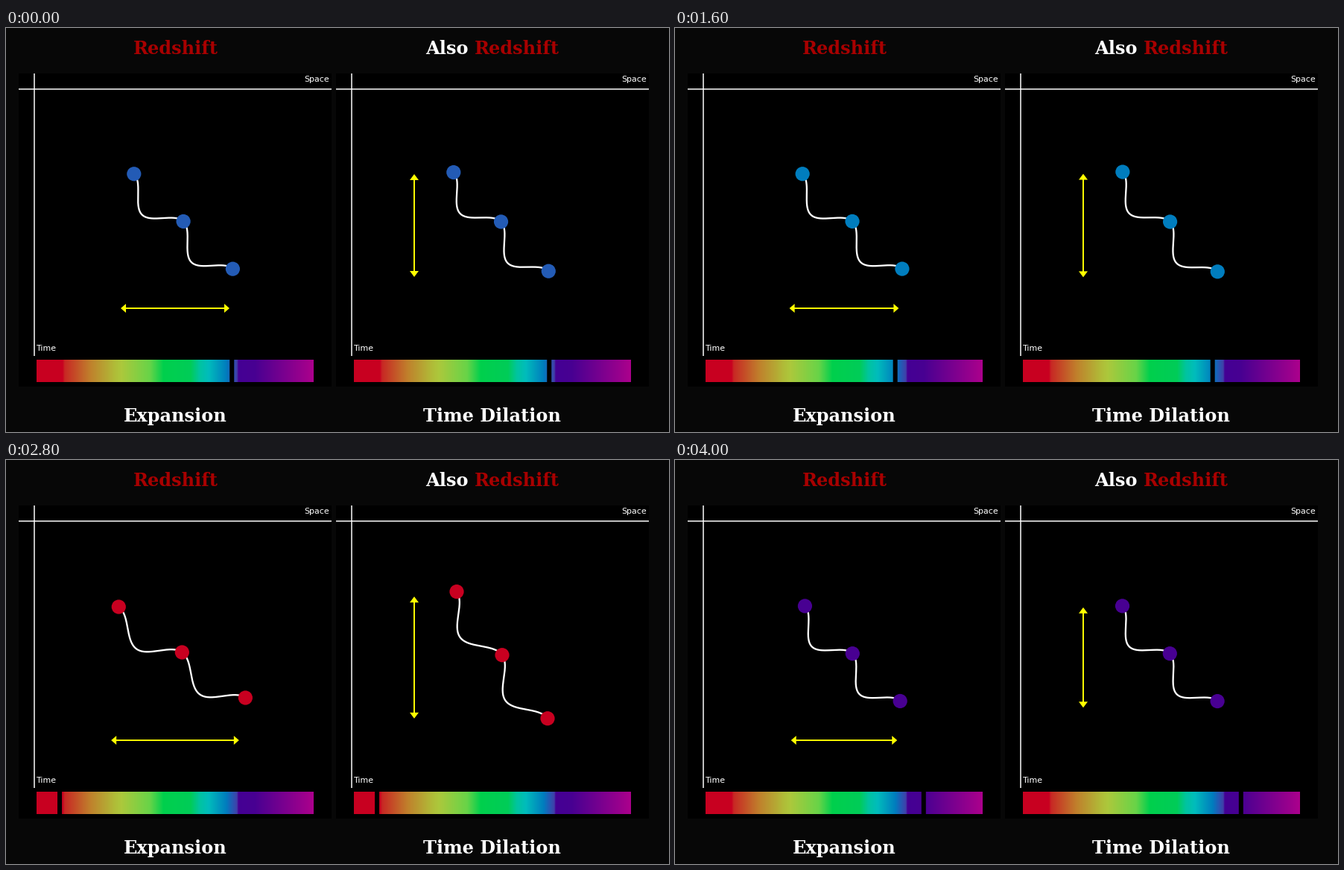
Animation, 890 px wide and 542 px high, one loop 4.1 s. Source, as a matplotlib script:

```python
import numpy as np
import matplotlib.pyplot as plt
from matplotlib.animation import FuncAnimation
from matplotlib.patches import Circle, Polygon, Rectangle

W, H, DPI = 890, 542, 100
PT = 72 / DPI                      # points per pixel
FRAMES, INTERVAL = 41, 100
CENTER = np.array([227.0, 271.0])  # middle of the left panel
SHIFT = 426                        # distance between the panels
AMP = 16
BAR_X, BAR_Y, BAR_W, BAR_H = 41, 445, 372, 30

# spectrum: x on the bar -> rgb
STOPS = [
    (41, 200, 0, 32), (76, 200, 0, 32), (79, 200, 40, 36),
    (113, 192, 128, 44), (146, 176, 188, 56), (155, 172, 200, 60),
    (193, 104, 212, 72), (208, 20, 208, 76), (211, 0, 208, 76),
    (248, 0, 204, 88), (260, 0, 196, 160), (272, 0, 188, 188),
    (296, 0, 124, 190), (303, 34, 92, 182), (310, 64, 64, 168),
    (312, 68, 0, 148), (334, 72, 0, 146), (413, 172, 0, 140),
]


def spectrum(x):
    xs, *channels = zip(*STOPS)
    return np.stack([np.interp(x, xs, c) for c in channels], axis=-1) / 255


fig = plt.figure(figsize=(W / DPI, H / DPI), dpi=DPI, facecolor="#070707")
ax = fig.add_axes([0, 0, 1, 1])
ax.axis("off")


def box(x, y, w, h, color, z):
    return ax.add_patch(Rectangle((x, y), w, h, fc=color, lw=0, zorder=z))


def line(xs, ys, color, width, z):
    return ax.plot(xs, ys, color=color, lw=width * PT, zorder=z, snap=False,
                   solid_capstyle="butt", solid_joinstyle="round")[0]


def label(x, y, text, size=11, color="white", family="DejaVu Sans",
          weight="normal"):
    ax.text(x, y, text, size=size * PT, color=color, family=family,
            weight=weight, ha="left", va="baseline", zorder=5)


def heading(x, y, text, color="white"):
    label(x, y, text, 24, color, "DejaVu Serif", "bold")


def wave(s, tau):
    """Rotated cosine through the panel centre; crests at whole tau."""
    length = 90.2 + 7.42 * (1 - s)
    angle = np.radians(45 - 4.8 * (1 - s))
    along = np.array([np.cos(angle), np.sin(angle)])
    normal = np.array([along[1], -along[0]])
    tau = np.asarray(tau, float)[:, None]
    return CENTER + tau * length * along + AMP * np.cos(2 * np.pi * tau) * normal


def mirror(points):
    """Swap the roles of space and time about the panel centre."""
    return CENTER - (points - CENTER)[:, ::-1]


class Panel:
    TAU = np.linspace(-1, 1, 241)

    def __init__(self, dx, upright):
        self.dx, self.upright = dx, upright
        box(17 + dx, 61, 420, 420, "black", 0)
        line([38 + dx] * 2, [61, 440], "white", 1.5, 1)
        line([17 + dx, 437 + dx], [82, 82], "white", 1.5, 1)
        label(400 + dx, 72, "Space")
        label(41 + dx, 433, "Time")
        colors = spectrum(BAR_X + 0.5 + np.arange(BAR_W))[None]
        ax.imshow(colors, interpolation="nearest", aspect="auto", zorder=1,
                  extent=(BAR_X + dx, BAR_X + BAR_W + dx, BAR_Y + BAR_H, BAR_Y))
        self.gap = box(0, BAR_Y, 6, BAR_H, "black", 2)
        self.gap.set_snap(False)
        self.curve = line([], [], "white", 2.3, 3)
        self.balls = [ax.add_patch(Circle((0, 0), 9.6, lw=0, zorder=4))
                      for _ in range(3)]
        self.shaft = line([], [], "yellow", 2, 3)
        self.heads = [ax.add_patch(Polygon(np.zeros((3, 2)), fc="yellow", lw=0,
                                           zorder=3)) for _ in range(2)]

    def place(self, points):
        if self.upright:
            points = mirror(points)
        return points + [self.dx, 0]

    def arrow(self, s):
        half = (74.7 if self.upright else 78.7) - 7.5 * s
        head = 8 if self.upright else 7
        middle = np.array([122, 265] if self.upright else [227, 376])

        def put(points):
            points = np.array(points, float)
            if self.upright:
                points = points[:, ::-1]
            return points + middle + [self.dx, 0]

        self.shaft.set_data(*put([(3 - half, 0), (half - 3, 0)]).T)
        for sign, patch in zip((-1, 1), self.heads):
            tip, base = sign * half, sign * (half - head)
            patch.set_xy(put([(tip, 0), (base, -6), (base, 6)]))

    def update(self, s):
        marker = 200 + 135 * s
        self.gap.set_x(marker - 3 + self.dx)
        self.curve.set_data(*self.place(wave(s, self.TAU)).T)
        for ball, pos in zip(self.balls, self.place(wave(s, [-1, 0, 1]))):
            ball.center = pos
            ball.set_facecolor(spectrum(marker))
        self.arrow(s)


panels = [Panel(0, False), Panel(SHIFT, True)]
RED = "#a80000"
heading(171, 35, "Redshift", RED)
heading(563, 35, "Also")
heading(629, 35, "Redshift", RED)
heading(158, 528, "Expansion")
heading(560, 528, "Time Dilation")
ax.set(xlim=(0, W), ylim=(H, 0))


def update(i):
    s = np.cos(0.7 + 0.3 * i)
    for panel in panels:
        panel.update(s)
    return []


anim = FuncAnimation(fig, update, frames=FRAMES, interval=INTERVAL,
                     repeat=True, repeat_delay=0, blit=False)
plt.show()
```
